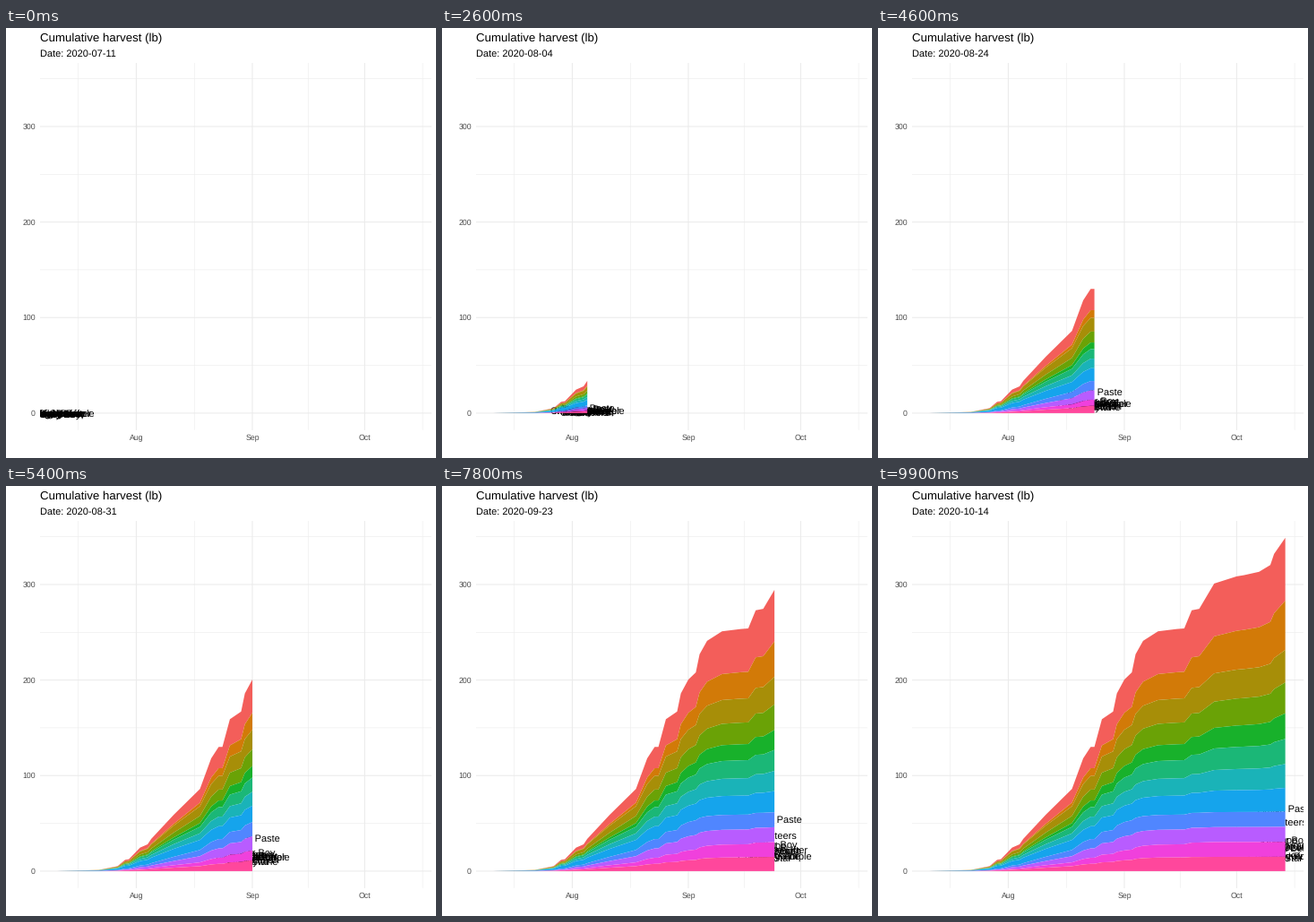
Write a matplotlib script that moves like this. It is 480x480 px and loops after 10 s.

```python
import numpy as np
import matplotlib.pyplot as plt
from matplotlib.animation import FuncAnimation

plt.rcParams["font.family"] = "Liberation Sans"
plt.rcParams["text.hinting"] = "none"

SIZE, DPI = 480, 80
PT = 72 / DPI  # points per pixel
FRAMES, LAST_DAY, TOP = 100, 95, 348.9
START = np.datetime64("2020-07-11")
LEFT, RIGHT, UPPER, LOWER = 37.9, 474.5, 39.2, 448.5

# name, colour, final pounds, growth power, share of the season when full
VARIETIES = [
    ("Amish Paste", "#F35E5A", 65.7, 1.12, 1),
    ("volunteers", "#D27A08", 51.6, 1.9, 1),
    ("Better Boy", "#A78E08", 34, .9, 1),
    ("grape", "#6AA206", 32.4, 1.08, 1),
    ("Old German", "#18B12B", 26.7, 1.4, 1),
    ("Mortgage Lifter", "#1BB777", 26.3, 1, 1),
    ("Big Beef", "#1AB3B8", 25, .95, 1),
    ("Bonny Best", "#15A4EC", 24.9, .65, 1),
    ("Cherokee Purple", "#5086FF", 15.8, 1.05, .6),
    ("Black Krim", "#B85CFF", 15.7, 1.05, .6),
    ("Brandywine", "#F040DC", 15.65, 1.2, .8),
    ("Jet Star", "#FF479C", 15, 1, .75),
]
NAMES, COLORS, FINAL, POWER, FULL = zip(*VARIETIES)

# Turning points of the total: (day, pounds)
PICKS = [(0, 0), (11, 1.2), (16, 5.2), (18, 11.8), (19, 12.4), (22, 24.6),
         (24, 28), (25, 33.8), (31, 59), (38, 86), (41, 118), (43, 130),
         (44, 130), (46, 159), (49, 167), (50, 186), (52, 200.5), (54, 208),
         (55, 227), (57, 241), (61, 251), (66, 253.4), (68, 254), (70, 273),
         (72, 274.5), (76, 301), (82, 308.5), (84, 309.8), (88, 313.3),
         (91, 320.4), (92, 332), (LAST_DAY, TOP)]
DAYS, POUNDS = np.array(PICKS).T
PICK_FRAMES = np.round(DAYS * (FRAMES - 1) / LAST_DAY)


def split(total):
    """Divide a total among the varieties, each on its own growth curve."""
    season = np.maximum(total, 1e-6) / TOP
    parts = np.array([lb * np.minimum(1, season / full) ** power
                      for lb, power, full in zip(FINAL, POWER, FULL)])
    return parts * total / parts.sum(axis=0)


fig = plt.figure(figsize=(SIZE / DPI, SIZE / DPI), dpi=DPI, facecolor="white")
ax = fig.add_axes([LEFT / SIZE, 1 - LOWER / SIZE,
                   (RIGHT - LEFT) / SIZE, (LOWER - UPPER) / SIZE])
ax.set_xlim(-.05 * LAST_DAY, 1.05 * LAST_DAY)
ax.set_ylim(-.05 * TOP, 1.05 * TOP)
ax.axis("off")


def write(x, y, text, px, color="black", ha="left"):
    return fig.text(x / SIZE, 1 - y / SIZE, text, fontsize=px * PT,
                    color=color, ha=ha, va="baseline")


def to_px(day, lb):
    x, y = ax.transData.transform((day, lb))
    return x, SIZE - y


def grid(draw, places, width):
    for p in places:
        draw(p, color="#EBEBEB", lw=width * PT, zorder=0, snap=False)


months = {"Aug": 21, "Sep": 52, "Oct": 82}
grid(ax.axvline, (5.5, 36.5, 67, 97.5), .55)
grid(ax.axhline, range(50, 351, 100), .55)
grid(ax.axvline, months.values(), 1.07)
grid(ax.axhline, range(0, 301, 100), 1.07)

for name, day in months.items():
    write(to_px(day, 0)[0], 460, name, 8.8, "#4D4D4D", "center")
for lb in range(0, 301, 100):
    write(33, to_px(0, lb)[1] + 3, str(lb), 8.8, "#4D4D4D", "right")
write(38, 15, "Cumulative harvest (lb)", 13.2)
date = write(38, 32, "", 11)

# Labels lie behind the bands, so only the parts outside them show
labels = [ax.text(0, 0, name, fontsize=11 * PT, ha="center", va="baseline",
                  clip_on=True, zorder=1) for name in NAMES]
bands = [ax.fill([0, 0, 0], [0, 0, 0], color=color, lw=0, zorder=2)[0]
         for color in COLORS]


def update(i):
    # Every picking day falls on a whole frame
    now = np.interp(i, PICK_FRAMES, DAYS)
    days = np.append(DAYS[DAYS <= now], now)
    parts = split(np.interp(days, DAYS, POUNDS))
    # The last variety lies at the bottom of the stack
    tops = np.cumsum(parts[::-1], axis=0)[::-1]
    floors = tops - parts
    for band, hi, lo in zip(bands, tops, floors):
        band.set_xy(np.column_stack([np.append(days, days[::-1]),
                                     np.append(hi, lo[::-1])]))
    for label, lb in zip(labels, parts[:, -1]):
        label.set_position((now, lb - 4.4))
    date.set_text(f"Date: {START + i * LAST_DAY // (FRAMES - 1)}")
    return [*bands, *labels, date]


anim = FuncAnimation(fig, update, frames=FRAMES, interval=100,
                     repeat=True, repeat_delay=0, blit=False)
plt.show()
```
